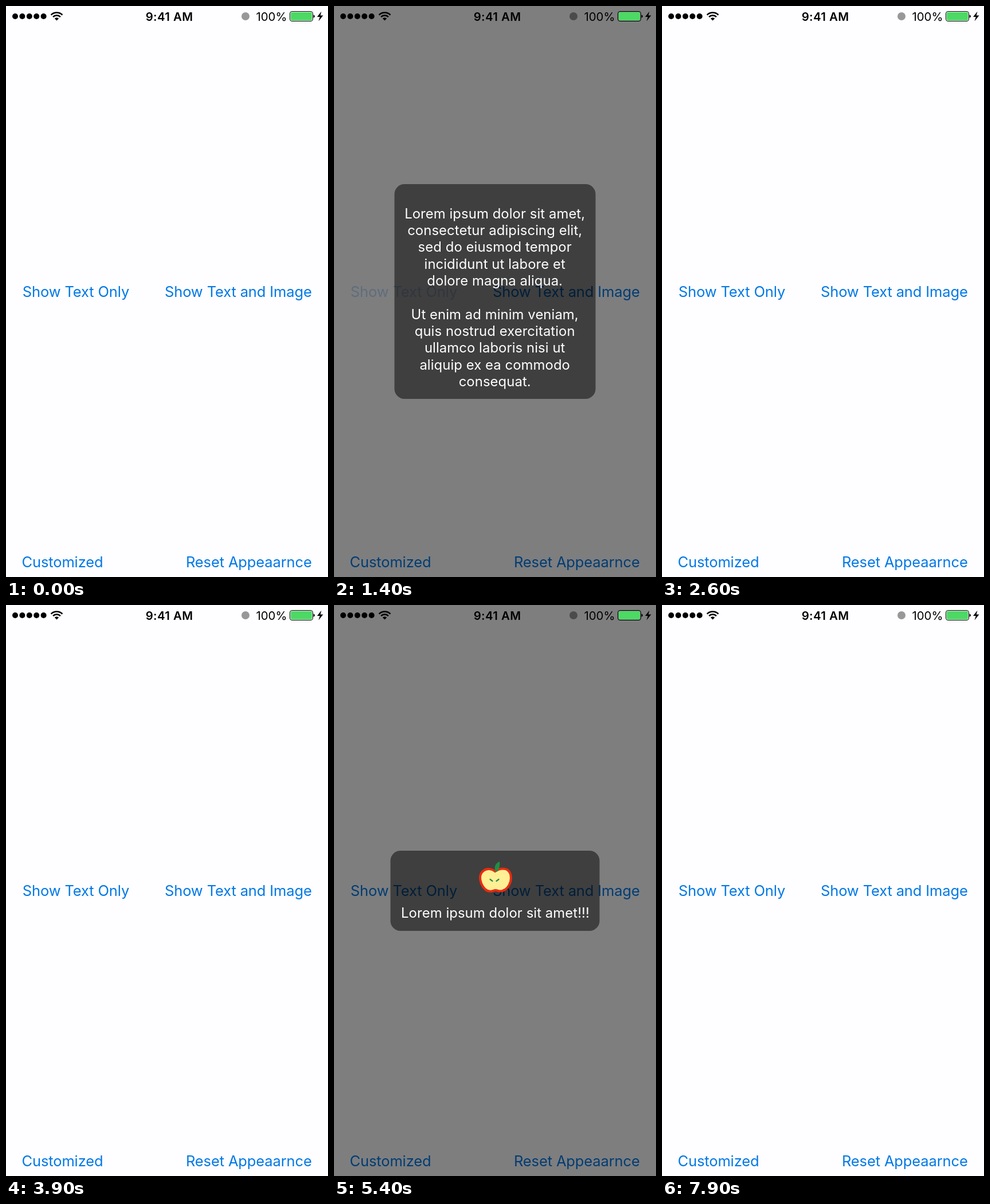
Animation of 562 by 997 pixels, one loop 8 s. Source, as an HTML page:

```html
<!DOCTYPE html>
<html lang="en">
<head>
<meta charset="utf-8">
<title>Popup overlay</title>
<style>
  html, body { margin: 0; height: 100%; overflow: hidden; background: #fefdff; }
  svg { display: block; width: 100vw; height: 100vh; }
  text { font-family: Inter, Roboto, sans-serif; font-optical-sizing: none; }
  .links { fill: #0079e6; font-size: 25.5px; letter-spacing: -.13px; }
  .popup { fill: #fff; font-size: 23.85px; letter-spacing: .08px; text-anchor: middle; }
  .popup .box { fill: #000; fill-opacity: .5; }
  .status { font-size: 20.4px; }
  .time { font-weight: 600; letter-spacing: .4px; text-anchor: middle; }
  .end { text-anchor: end; }
</style>
</head>
<body>
<svg viewBox="0 0 562 997" preserveAspectRatio="none">
  <rect width="562" height="997" fill="#fefdff"/>

  <g class="links">
    <text id="textLink" x="28.8" y="508.3">Show Text Only</text>
    <text id="imageLink" class="end" x="533.7" y="508.3">Show Text and Image</text>
    <text x="27.5" y="980.3">Customized</text>
    <text class="end" x="533.7" y="980.3">Reset Appeaarnce</text>
  </g>

  <rect id="dim" width="562" height="997" fill-opacity=".5"/>

  <g id="textPopup" class="popup">
    <rect class="box" x="105.5" y="311" width="351" height="375" rx="17.5"/>
  </g>

  <g id="imagePopup" class="popup">
    <rect class="box" x="98.5" y="429" width="365" height="140" rx="17.5"/>
    <path fill="#fff095" stroke="#ec2a12" stroke-width="4"
      d="M281 465C276 461 267 459 261 464C254 469 254 478 257 486
         C260 494 266 500 273 500C277 500 279 498 282 498
         C286 498 289 501 294 499C301 497 306 490 308 483
         C310 474 308 466 302 462C295 459 287 461 281 465Z"/>
    <path fill="#1f8f46" d="M282 466C279 458 281 451 289 448C290 456 288 461 284 466Z"/>
    <path stroke="#2e8f4a" stroke-width="2.2" stroke-linecap="round" d="M272.5 479l4 3M287.5 479l-4 3"/>
    <text x="281.5" y="545.6">Lorem ipsum dolor sit amet!!!</text>
  </g>

  <g class="status">
    <g id="signal"></g>
    <path fill="none" stroke="#000" stroke-width="2.7"
      d="M78.6 15.6A14 14 0 0 1 98.4 15.6M82.1 19.1A9 9 0 0 1 94.9 19.1"/>
    <path d="M88.5 25.5L84.8 21.8A5.2 5.2 0 0 1 92.2 21.8Z"/>
    <text class="time" x="285" y="25.6">9:41 AM</text>
    <circle cx="418" cy="18" r="7" fill-opacity=".4"/>
    <text class="end" x="490.5" y="25.6">100%</text>
    <rect x="495.5" y="9.5" width="40" height="17" rx="3.5" fill="none" stroke="#000"/>
    <rect x="496.8" y="10.8" width="37.4" height="14.4" rx="2.4" fill="#4cd964"/>
    <path d="M536.6 15.2q2.4 .6 2.4 2.8t-2.4 2.8z"/>
    <path d="M550.5 9.5L543 19H547.8L545.5 26.5L553.5 16.5H548.7Z"/>
  </g>
</svg>

<script>
const LOOP = 8000;
const FADE = 350; // a tapped link regains its colour
const popups = [
  { panel: "textPopup", link: "textLink", open: 1400, close: 2600 },
  { panel: "imagePopup", link: "imageLink", open: 4000, close: 5500 }
];
const lines = [
  "Lorem ipsum dolor sit amet,", "consectetur adipiscing elit,", "sed do eiusmod tempor",
  "incididunt ut labore et", "dolore magna aliqua.", "",
  "Ut enim ad minim veniam,", "quis nostrud exercitation", "ullamco laboris nisi ut",
  "aliquip ex ea commodo", "consequat."
];
const get = id => document.getElementById(id);

function add(parent, tag, attrs, text = "") {
  const el = document.createElementNS("http://www.w3.org/2000/svg", tag);
  for (const key in attrs) el.setAttribute(key, attrs[key]);
  el.textContent = text;
  parent.append(el);
}

lines.forEach((line, i) => add(get("textPopup"), "text", { x: 280.7, y: 370.6 + i * 29.33 }, line));
for (let i = 0; i < 5; i++) add(get("signal"), "circle", { cx: 16 + i * 12.4, cy: 18, r: 5 });

const show = (id, on) => get(id).style.visibility = on ? "visible" : "hidden";

function draw() {
  const t = performance.now() % LOOP;
  let dimmed = false;
  for (const p of popups) {
    const open = t >= p.open && t < p.close;
    dimmed ||= open;
    show(p.panel, open);
    get(p.link).style.opacity = open ? Math.min(1, .25 + .75 * (t - p.open) / FADE) : 1;
  }
  show("dim", dimmed);
  requestAnimationFrame(draw);
}
draw();
</script>
</body>
</html>
```
